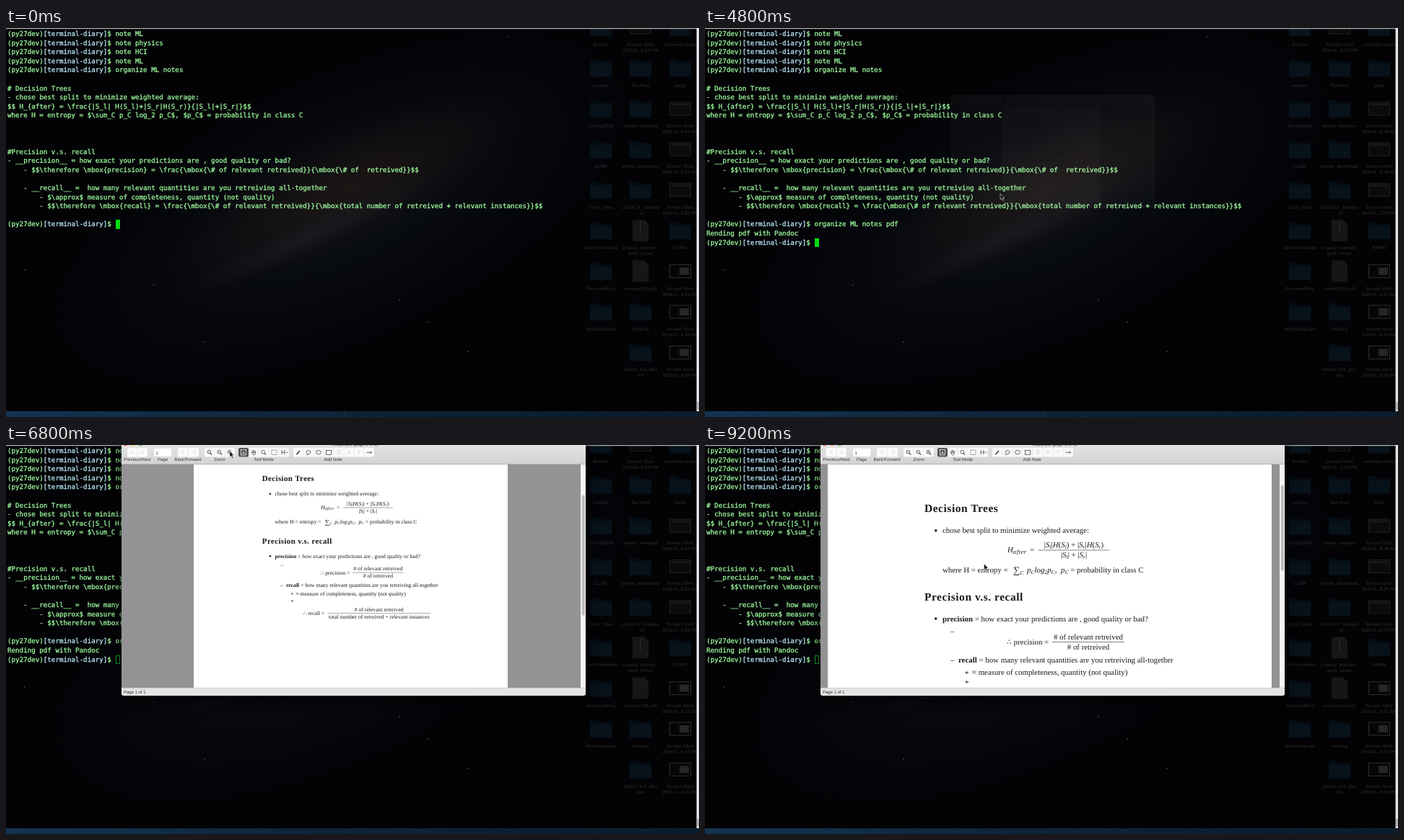
An HTML page for the animation above (9.4 s loop, 960 by 540 pixels).

```html
<!DOCTYPE html>
<html lang="en">
<head>
<meta charset="utf-8">
<title>Terminal notes to PDF</title>
<style>
html, body { margin: 0; width: 100%; height: 100%; overflow: hidden; background: #030307; }
body { position: relative; text-rendering: geometricPrecision; }
svg { position: absolute; left: 0; top: 0; }
#term {
  position: absolute; left: 2px; top: 3px; margin: 0; white-space: pre; color: #9dfb9d;
  font: 9.2px/12.59px "DejaVu Sans Mono", monospace; -webkit-text-stroke: .3px;
}
#term i { font-style: normal; color: #b8e8f6; }
#caret { position: absolute; width: 6px; height: 12.5px; box-sizing: border-box; background: #00dc0c; }
#caret.idle { background: none; border: 1px solid #1ea828; }
.label { font: bold 6.4px "Liberation Sans", Arial, sans-serif; fill: #222224; text-anchor: middle; }
.ui { font: 6px "Liberation Sans", Arial, sans-serif; fill: #333; }
.mid { text-anchor: middle; }
.doc { font: 10.85px "Liberation Serif", Times, serif; fill: #1a1a1a; }
.doc .head { font-size: 15.5px; font-weight: bold; letter-spacing: .52px; }
.doc .b { font-weight: bold; }
.doc .m { font-style: italic; }
.doc .sub { font-size: 7.6px; }
.doc .wide { font-size: 8.6px; letter-spacing: .5px; }
</style>
</head>
<body>
<svg id="desk" width="960" height="540" viewBox="0 0 960 540"></svg>
<pre id="term"></pre>
<div id="caret"></div>
<svg id="top" width="960" height="540" viewBox="0 0 960 540"></svg>
<script>
const $ = id => document.getElementById(id);
const LOOP = 9400, STEP = 200, CHAR = 5.539, ROW = 12.59;

const rect = (x, y, w, h, fill, more = '') =>
  `<rect x="${x}" y="${y}" width="${w}" height="${h}" fill="${fill}" ${more}/>`;
const text = (x, y, s, cls = '') => `<text x="${x}" y="${y}" class="${cls}">${s}</text>`;
const line = (d, color = '#444', w = .8) =>
  `<path d="${d}" fill="none" stroke="${color}" stroke-width="${w}"/>`;

// ---- desktop ----
function random(seed) {
  return () => (seed = (seed * 16807) % 2147483647) / 2147483647;
}

function stars() {
  const rnd = random(77);
  let out = '';
  for (let i = 0; i < 120; i++) {
    out += `<circle cx="${(rnd() * 955).toFixed(1)}" cy="${(rnd() * 530).toFixed(1)}" r="${(.3 + rnd() * .4).toFixed(2)}" fill="#8a96a8" opacity="${(.06 + rnd() * .18).toFixed(2)}"/>`;
  }
  for (const [x, y] of [[26, 336], [205, 357], [585, 408], [640, 449], [545, 377], [695, 12], [275, 436]])
    out += `<circle cx="${x}" cy="${y}" r="1" fill="#7c8798" opacity=".45"/>`;
  for (let i = 0; i < 60; i++)
    out += rect((rnd() * 955).toFixed(1), (532.5 + rnd() * 6).toFixed(1), 1, 1, '#5f8db0', `opacity="${(rnd() * .5).toFixed(2)}"`);
  return out;
}

const icons = {
  folder: (x, y) => `<path d="M${x - 15} ${y + 12}v-23q0-1 1-1h9l3 3h16q1 0 1 1v20z" fill="#050d14"/>` +
    rect(x - 15, y - 6, 30, 18, '#07121b', 'rx="1"'),
  shot: (x, y) => rect(x - 14.5, y - 9, 29, 18, '#0b0a0c', 'stroke="#202022"') + rect(x - 13, y - 7.5, 26, 3, '#19191b'),
  dark: (x, y) => rect(x - 14.5, y - 9, 29, 18, '#060608', 'stroke="#2e2e30"') + rect(x - 1, y - 5, 13, 10, '#262628'),
  file: (x, y) => `<path d="M${x - 11} ${y - 15}h16l6 6v24h-22z" fill="#161618"/>` + line(`M${x + 5} ${y - 15}v6h6`, '#222224'),
  zip: (x, y) => icons.file(x, y) + line(`M${x} ${y - 14}v18`, '#232325', 2)
};

function desktop() {
  const columns = [
    [824, 'folder:Boxfile', 'folder:remote', 'folder:Spring2016', 'folder:LLSM', 'folder:Curly_Files',
      'folder:StartFormation', 'folder:PersonalProj', 'folder:WorkshopLab'],
    [879, 'shot:Screen Shot|2016-0...3.52 PM', 'folder:Tax Prof', 'folder:urban_samples', 'folder:phone_download',
      'folder:LEGACY_stamps|_v2', 'zip:Legacy_stamps_|path_v2.tar', 'file:Invoice139.pdf', 'folder:moving', 'folder:object_kid_phe|ros'],
    [934, 'folder:common notes', 'folder:daily', 'shot:Screen Shot|2016-0...8.49 AM', 'shot:Screen Shot|2016-0...8.39 AM',
      'shot:Screen Shot|2016-0...2.09 PM', 'folder:KDRN', 'dark:Screen Shot|2016-0...4.31 AM', 'dark:Screen Shot|2016-0...5.43 PM',
      'dark:Screen Shot|2016-0...4.06 PM']
  ];
  return columns.map(([x, ...items]) => items.map((item, i) => {
    const [kind, name] = item.split(':'), y = +(i * 56.4 - .8).toFixed(1);
    return icons[kind](x, y) + name.split('|').map((s, k) => text(x, y + 26 + k * 8, s, 'label')).join('');
  }).join('')).join('');
}

const glow = (id, inner, a) => `<radialGradient id="${id}"><stop offset="0" stop-color="${inner}" stop-opacity="${a}"/>
  <stop offset="1" stop-color="${inner}" stop-opacity="0"/></radialGradient>`;

$('desk').innerHTML = `<defs>${glow('blue', '#141c28', .5)}${glow('warm', '#2a1c14', .55)}${glow('haze', '#22242a', .45)}
  <linearGradient id="strip"><stop offset="0" stop-color="#143350"/><stop offset=".5" stop-color="#0d2338"/><stop offset="1" stop-color="#0b1c2d"/></linearGradient></defs>
  ${rect(0, 0, 960, 540, '#030306')}
  <g transform="translate(465 250) rotate(-25)">
    <ellipse rx="440" ry="190" fill="url(#blue)"/><ellipse cx="20" cy="-22" rx="270" ry="80" fill="url(#warm)"/>
    <ellipse cx="-60" cy="16" rx="200" ry="22" fill="url(#haze)"/>
  </g>
  ${rect(0, 532, 960, 8, 'url(#strip)')}${stars()}${desktop()}
  ${rect(0, 0, 960, 1.3, '#a9a9a9')}${rect(956.6, 0, 3.4, 532, '#e6e6e6')}${rect(957.5, 519, 2, 11, '#9c9c9c', 'rx="1"')}`;

// ---- terminal ----
const PROMPT = '(py27dev)<i>[terminal-diary]</i>$ ';
const COMMAND = 'organize ML notes pdf';
const history = ['note ML', 'note physics', 'note HCI', 'note ML', 'organize ML notes'].map(s => PROMPT + s).join('\n');
const notes = String.raw`

# Decision Trees
- chose best split to minimize weighted average:
$$ H_{after} = \frac{|S_l| H(S_l)+|S_r|H(S_r)}{|S_l|+|S_r|}$$
where H = entropy = $\sum_C p_C log_2 p_C$, $p_C$ = probability in class C



#Precision v.s. recall
- __precision__ = how exact your predictions are , good quality or bad?
    - $$\therefore \mbox{precision} = \frac{\mbox{\# of relevant retreived}}{\mbox{\# of  retreived}}$$

    - __recall__ =  how many relevant quantities are you retreiving all-together
        - $\approx$ measure of completeness, quantity (not quality)
        - $$\therefore \mbox{recall} = \frac{\mbox{\# of relevant retreived}}{\mbox{total number of retreived + relevant instances}}$$

`;

function terminal(t) {
  const typed = Math.min(COMMAND.length, Math.round(t / 1600 * COMMAND.length));
  let out = history + notes + PROMPT + COMMAND.slice(0, typed), row = 21, col = 27 + typed;
  if (t >= 2000) { row = 22; col = 0; }
  if (t >= 2200) { out += '\nRending pdf with Pandoc'; row = 23; }
  if (t >= 4400) { out += '\n' + PROMPT; col = 27; }
  if ($('term').innerHTML !== out) $('term').innerHTML = out;
  const caret = $('caret');
  caret.style.left = 2 + col * CHAR + 'px';
  caret.style.top = 2 + row * ROW + 'px';
  caret.className = t >= 5000 ? 'idle' : '';
}

// ---- viewer window ----
const lens = x => `<circle cx="${x - .7}" cy="9.6" r="2.4" fill="none" stroke="#444" stroke-width=".8"/>` + line(`M${x + 1.2} 11.5l2 2`, '#444', 1.1);

function toolbar() {
  const groups = [[168, 28], [238, 29], [275, 42], [322, 70], [398, 112]];
  const labels = [[182, 'Previous/Next'], [217, 'Page'], [252, 'Back/Forward'], [296, 'Zoom'], [357, 'Tool Mode'], [453, 'Add Note']];
  const pale = '#cfcfcf';
  let out = rect(160, -9, 643, 36, 'url(#bar)') + line('M160 26.6H803', '#a9a9a9', .8);
  ['#ee6a5f', '#f5bd4f', '#61c454'].forEach((c, i) => out += `<circle cx="${165.5 + i * 10.5}" cy="-1.8" r="3.2" fill="${c}"/>`);
  out += text(484, 1.2, 'output.pdf (page 1 of 1)', 'ui mid');
  for (const [x, w] of groups) {
    out += rect(x, 4, w, 12.5, '#fafafa', 'rx="2"');
    for (let k = 14; k < w - 4; k += 14) out += line(`M${x + k} 4v12.5`, '#dedede', .6);
  }
  out += rect(205, 4.5, 24.5, 11.5, '#fff', 'stroke="#ddd" stroke-width=".5"') + text(207.5, 12.8, '1', 'ui');
  out += line('M173 12l2-3 2 3M187 9l2 3 2-3M246 8l-2 2.4 2 2.4M260 8l2 2.4-2 2.4', pale);
  out += [282, 296, 310, 357].map(lens).join('');
  out += line('M280 9.6h2.6M294 9.6h2.6M308 9.6h2.6M309.3 8.3v2.6', '#444', .6);
  out += rect(322, 4, 14, 12.5, '#555', 'rx="2"') + rect(325.5, 6.5, 7, 7.5, 'none', 'stroke="#fff" stroke-width=".7"') +
    text(329, 12.5, '<tspan fill="#fff">A</tspan>', 'ui mid');
  out += line('M340.5 10.5v-2M342.2 10v-3.3M343.8 10v-3M345.4 10.5v-2.4M340.5 10.5q1 3.5 3 3.5t2-3.5z');
  out += rect(368, 7, 7, 6.5, 'none', 'stroke="#444" stroke-width=".8" stroke-dasharray="1.4 1"');
  out += line('M382 7v6.5M382 10.2h4M386 7v6.5M388 9.5l1.3 1.5 1.3-1.5');
  out += line('M402.5 13l4.5-5', '#333', 1.5) + line('M416 10a3 2.4 0 1 1 3 2.4l-2 1.6v-2z');
  out += `<ellipse cx="433" cy="10.2" rx="3.6" ry="2.8" fill="none" stroke="#444" stroke-width=".8"/>` + rect(443.5, 7.3, 7, 6, 'none', 'stroke="#444" stroke-width=".8"');
  out += line('M458.5 8h5M458.5 10.3h5M458.5 12.6h5M473 13l2-5 2 5M486.5 8h5M489 8v5', pale);
  out += line('M499.5 10.3h7M504.7 8.5l2 1.8-2 1.8');
  return out + labels.map(([x, s]) => text(x, 22, s, 'ui mid')).join('');
}

const span = (s, cls, dy = 0, x) => `<tspan class="${cls}" dy="${dy}"${x ? ` x="${x}"` : ''}>${s}</tspan>`;
const sub = (s, k, cls = '') => span(s, 'm') + span(k, 'm sub ' + cls, 1.6) + '<tspan dy="-1.6">&#8203;</tspan>';
const S = k => '|' + sub('S', k) + '|';
const HS = k => span('H', 'm') + '(' + sub('S', k) + ')';
const frac = (x1, x2, y, a, b) => text((x1 + x2) / 2, y - 4, a, 'mid') + line(`M${x1} ${y}H${x2}`, '#1a1a1a', .55) +
  text((x1 + x2) / 2, y + 10, b, 'mid');
const dot = y => `<circle cx="319.7" cy="${y}" r="1.8"/>`;

// Page contents at the largest zoom
function page() {
  const top = '# of relevant retreived';
  return text(304, 93, 'Decision Trees', 'head') +
    dot(118.8) + text(329, 122, 'chose best split to minimize weighted average:') +
    text(419, 149, sub('H', 'after', 'wide') + span('=', '', 0, 450)) +
    frac(462, 560, 146, `${S('l')}${HS('l')} + ${S('r')}${HS('r')}`, `${S('l')} + ${S('r')}`) +
    text(329, 177, 'where H = entropy = ') + text(427, 178, '<tspan font-size="13">∑</tspan>' + span('C', 'm sub', 1.5)) +
    text(446, 177, sub('p', 'C') + span('log', 'm') + span('2', 'sub', 1.6) + span('p', 'm', -1.6) + span('C', 'm sub', 1.6) + span(', ', '', -1.6)) +
    text(493, 177, sub('p', 'C') + ' = probability in class C') +
    text(304, 216, 'Precision v.s. recall', 'head') +
    dot(241) + text(329, 244.5, span('precision', 'b') + ' = how exact your predictions are , good quality or bad?') +
    text(340, 262, '–') + text(418, 277, '∴ precision =') + frac(481, 581, 273.5, top, '# of retreived') +
    text(340, 301.5, '–') + text(351, 301.5, span('recall', 'b') + ' = how many relevant quantities are you retreiving all-together') +
    text(360, 320.5, '*') + text(370, 319, '≈ measure of completeness, quantity (not quality)') +
    text(360, 333.5, '*') + text(384, 357, '∴ recall =') +
    frac(432, 634, 353.3, top, 'total number of retreived + relevant instances');
}

$('top').innerHTML = `<defs>
  <linearGradient id="bar" x2="0" y2="1"><stop offset="0" stop-color="#e9e9e9"/><stop offset="1" stop-color="#d3d3d3"/></linearGradient>
  <clipPath id="view">${rect(160, 27, 636, 310, '#000')}</clipPath>
  <filter id="soft" x="-10%" y="-10%" width="120%" height="125%"><feGaussianBlur stdDeviation="8"/></filter></defs>
  <g id="win">
    <g id="shade">${rect(158, -4, 647, 362, '#000', 'opacity=".6" filter="url(#soft)"')}</g>
    <rect id="left" x="160" y="27" height="310" fill="#939294"/><rect id="right" y="27" height="310" fill="#939294"/>
    <g clip-path="url(#view)"><rect id="paper" y="27" height="310" fill="#fff"/><g id="doc" class="doc">${page()}</g></g>
    ${rect(796, 27, 7, 310, '#f4f4f4')}<rect id="thumb" x="797.8" width="4" rx="2" fill="#bdbdbd"/>
    ${toolbar()}
    <path d="M160 337H803V345q0 3-3 3H163q-3 0-3-3z" fill="#e4e4e4"/>${line('M160 337.3H803', '#bbb', .6)}
    ${text(163, 345, 'Page 1 of 1', 'ui')}
  </g>
  <path id="arrow" d="M0 0v8.2l1.9-1.7 1.4 3 1.4-.7-1.4-2.9h2.6z" fill="#111" stroke="#ddd" stroke-width=".6"/>
  <path id="beam" d="M-1.8-4Q0-4 0-3Q0-4 1.8-4M0-3V3M-1.8 4Q0 4 0 3Q0 4 1.8 4M-1 1H1" fill="none" stroke="#333" stroke-width=".8"/>`;

// Piecewise linear value over rows of [time, ...values]
function along(keys, t) {
  const i = keys.findIndex(k => k[0] > t);
  if (i < 0) return keys[keys.length - 1].slice(1);
  if (i === 0) return keys[0].slice(1);
  const a = keys[i - 1], b = keys[i], p = (t - a[0]) / (b[0] - a[0]);
  return a.slice(1).map((v, k) => v + (b[k + 1] - v) * p);
}
const set = (id, attrs) => { for (const k in attrs) $(id).setAttribute(k, attrs[k]); };

const mousePath = [[4800, 409, 230], [5200, 400, 195], [5800, 372.5, 81], [6400, 310, 8.5], [7000, 310, 8.5],
  [7600, 390.5, 160], [7800, 390.5, 160], [8400, 386.5, 165]];
const scrollPath = [[7000, -9.5], [7400, -9.5], [7800, 27], [8400, 88]];

function viewer(t) {
  const opening = t < 5000;
  set('win', {
    visibility: t < 4800 ? 'hidden' : 'visible',
    opacity: opening ? .04 : 1,
    transform: opening ? 'translate(481.5 171.5) scale(.44) translate(-481.5 -169.5)' : ''
  });
  set('shade', { display: opening ? 'none' : 'inline' });

  const zoom = t < 6600 ? .5 : t < 7000 ? Math.SQRT1_2 : 1;
  const headY = t < 6600 ? 85 : t < 7000 ? 46 : along(scrollPath, t)[0];
  const half = 307.7 * zoom, x0 = 477.5 - half, x1 = 477.5 + half;
  set('left', { width: x0 - 160 });
  set('right', { x: x1, width: 796 - x1 });
  set('paper', { x: x0, width: half * 2 });
  set('doc', { transform: `translate(477.5 ${headY}) scale(${zoom}) translate(-477.5 -88)` });

  const total = 796 * zoom + 12, offset = 33 - (headY - 130 * zoom);
  set('thumb', { y: 27 + offset / total * 310, height: 310 / total * 310 });
}

function pointer(t) {
  const [x, y] = along(mousePath, t);
  const beam = t >= 5200 && t < 8400 && y > 27;
  set('arrow', { visibility: t >= 4800 && !beam ? 'visible' : 'hidden', transform: `translate(${x} ${y})` });
  set('beam', { visibility: beam ? 'visible' : 'hidden', transform: `translate(${x} ${y})` });
}

const start = performance.now();
let last = -1;
function draw() {
  const t = Math.floor((performance.now() - start) % LOOP / STEP) * STEP;
  if (t !== last) {
    terminal(t);
    viewer(t);
    pointer(t);
    last = t;
  }
  requestAnimationFrame(draw);
}
draw();
</script>
</body>
</html>
```
